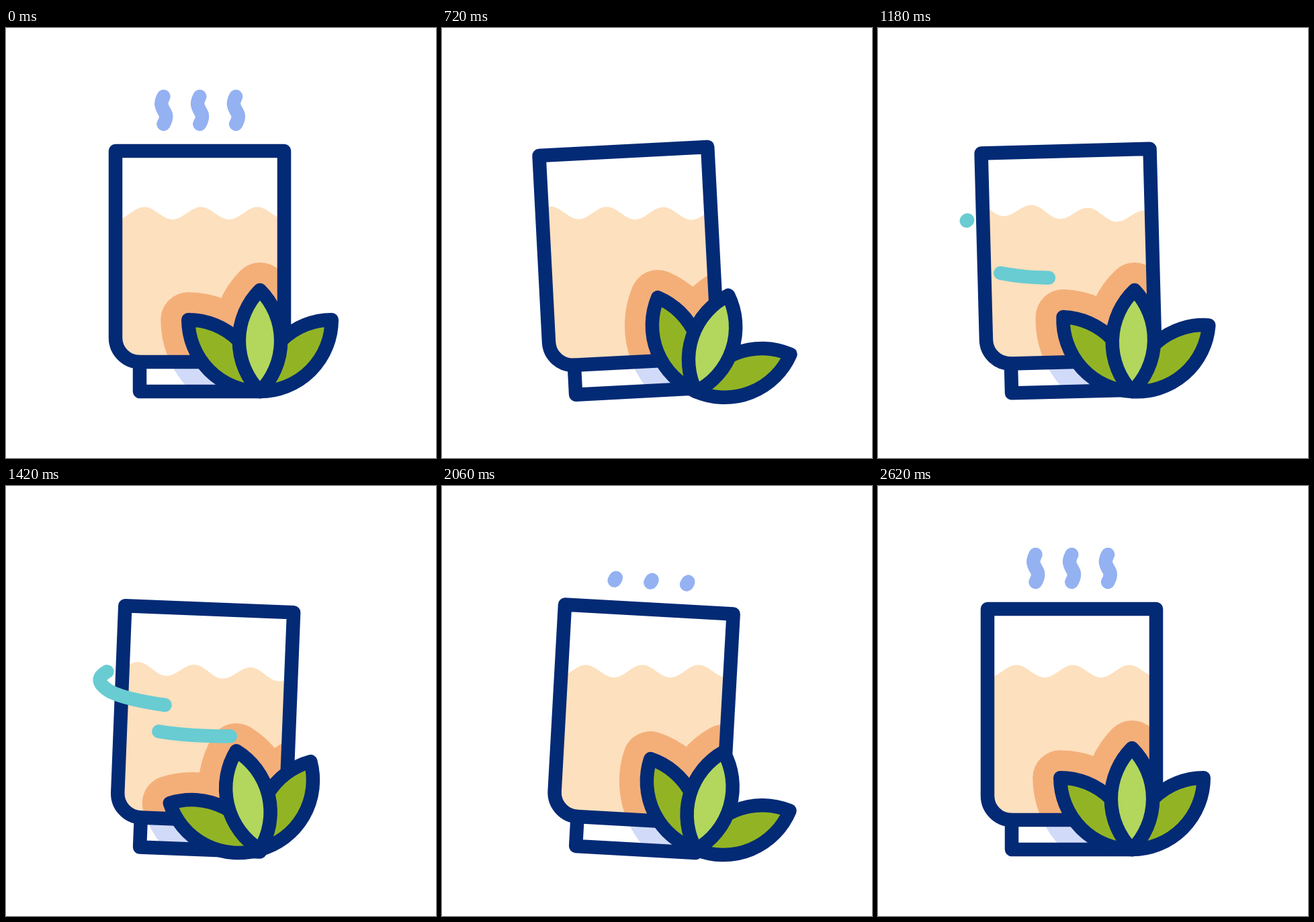
An HTML page with a canvas for the animation above (3 s loop, 640 px wide and 640 px high).

```html
<!DOCTYPE html>
<html lang="en">
<head>
<meta charset="utf-8">
<title>Herbal tea</title>
<style>
html, body { margin: 0; width: 100%; height: 100%; overflow: hidden; background: #fff; }
canvas { display: block; }
</style>
</head>
<body>
<canvas id="stage" width="640" height="640"></canvas>
<script>
const ctx = document.getElementById('stage').getContext('2d');
const LOOP = 3000, START = 200, END = 2620;
const LINE = 20.5, HALO = 82, STEAM_LENGTH = 44;
const NAVY = '#032a75', TEAL = '#68ccd2', STEAM = '#94b1f2';
const GREEN = '#92b424', LIGHT_GREEN = '#b2d75c';

const glass = new Path2D('M163 183H414V461A36 36 0 0 1 378 497H199A36 36 0 0 1 163 461Z');
const base = new Path2D('M199 497V541H378');
const baseArea = new Path2D('M199 497H378V541H199Z');
const leaf = new Path2D('M0 0A107 107 0 0 1 0 -151A107 107 0 0 1 0 0Z');
const steam = new Path2D('M234.5 143C238 137 240 131 236 125C230 115 230 111 234.5 102');
const winds = [
  { path: new Path2D('M140 282C125 291 126 301 147 312C185 328 300 340 395 324'), start: 1178, length: 285 },
  { path: new Path2D('M187 362Q260 379 391 366'), start: 980, length: 195 }
];

// Progress from 0 to 1
const ramp = (t, start, duration) => Math.min(1, Math.max(0, (t - start) / duration));

// Pendulum motion through its turning points [ms, value]
function swing(t, ...points) {
  let value = points[0][1];
  for (let i = 1; i < points.length; i++) {
    const [t0, a] = points[i - 1], [t1, b] = points[i];
    value += (b - a) * (1 - Math.cos(Math.PI * ramp(t, t0, t1 - t0))) / 2;
  }
  return value;
}

const glassTilt = t => swing(t, [START, 0], [915, -3.6], [1710, 4.7], [END, 0]);
const liquidTilt = t => swing(t, [560, 0], [1300, 3], [1950, 0]);
const leafSway = t => swing(t, [340, 0], [800, 25], [1600, -22], [2040, 20.5], [END, 0]);
const leafSpread = t => swing(t, [START, 0], [2320, 2.2], [END, 0]);

function scoped(draw) {
  ctx.save();
  draw();
  ctx.restore();
}

function turn(x, y, degrees) {
  ctx.translate(x, y);
  ctx.rotate(degrees * Math.PI / 180);
  ctx.translate(-x, -y);
}

const turnGlass = degrees => turn(289, 541, degrees);

function stroke(path, color, width = LINE) {
  ctx.strokeStyle = color;
  ctx.lineWidth = width;
  ctx.stroke(path);
}

function trim(path, from, to, color) {
  if (to - from < 0.01) return;
  ctx.setLineDash([to - from, 999]);
  ctx.lineDashOffset = -from;
  stroke(path, color);
  ctx.setLineDash([]);
}

// The middle leaf swings less and slightly ahead of the outer ones
function drawLeaves(t, line, width, halo) {
  const sway = leafSway(t), open = 45 + leafSpread(t);
  const angles = [sway - open, sway + open, 0.78 * leafSway(t + 15)];
  angles.forEach((angle, i) => scoped(() => {
    ctx.translate(378, 541);
    turn(0, 0, angle);
    ctx.fillStyle = halo ? line : i < 2 ? GREEN : LIGHT_GREEN;
    ctx.fill(leaf);
    stroke(leaf, line, width);
  }));
}

const drawHalo = (t, color) => drawLeaves(t, color, HALO, true);

function drawLiquid(t, tilt) {
  const level = 275.7, period = 84;
  const drift = 4 * period * ramp(t, START, END - START) ** 1.2;
  const crest = 206 + drift + 266 * Math.sin(tilt * Math.PI / 180);
  turn(289, level, liquidTilt(t));
  ctx.beginPath();
  ctx.moveTo(60, 620);
  for (let x = 60; x <= 520; x += 2)
    ctx.lineTo(x, level - 9.3 * Math.cos(2 * Math.PI * (x - crest) / period));
  ctx.lineTo(520, 620);
  ctx.fillStyle = '#fde0be';
  ctx.fill();
}

// Clip to a part of the tilted glass while drawing upright
function inside(area, tilt, draw) {
  scoped(() => {
    turnGlass(tilt);
    ctx.clip(area);
    turnGlass(-tilt);
    draw();
  });
}

function drawSteam(t) {
  const growing = t > 1000;
  const from = growing ? 0 : STEAM_LENGTH * ramp(t, START, 515);
  const to = growing ? STEAM_LENGTH * ramp(t, 2020, 400) : STEAM_LENGTH;
  for (let i = 0; i < 3; i++) scoped(() => {
    ctx.translate(i * 53.8, 0);
    trim(steam, from, to, STEAM);
  });
}

function drawWinds(t) {
  for (const { path, start, length } of winds) {
    const head = 1 - (1 - ramp(t, start, 800)) ** 1.6;
    const tail = ramp(t, start + 350, 520);
    trim(path, tail * length, head * length, TEAL);
  }
}

function render(t) {
  const tilt = glassTilt(t);
  ctx.fillStyle = '#fff';
  ctx.fillRect(0, 0, 640, 640);
  ctx.lineCap = ctx.lineJoin = 'round';

  inside(baseArea, tilt, () => drawHalo(t, '#d1dbf9'));
  inside(glass, tilt, () => {
    scoped(() => drawLiquid(t, tilt));
    drawHalo(t, '#f4af79');
  });

  scoped(() => {
    turnGlass(tilt);
    drawSteam(t);
    stroke(base, NAVY);
    stroke(glass, NAVY);
    drawWinds(t);
  });

  drawLeaves(t, NAVY, LINE);
}

const begin = performance.now();
function frame() {
  render((performance.now() - begin) % LOOP);
  requestAnimationFrame(frame);
}
frame();
</script>
</body>
</html>
```
